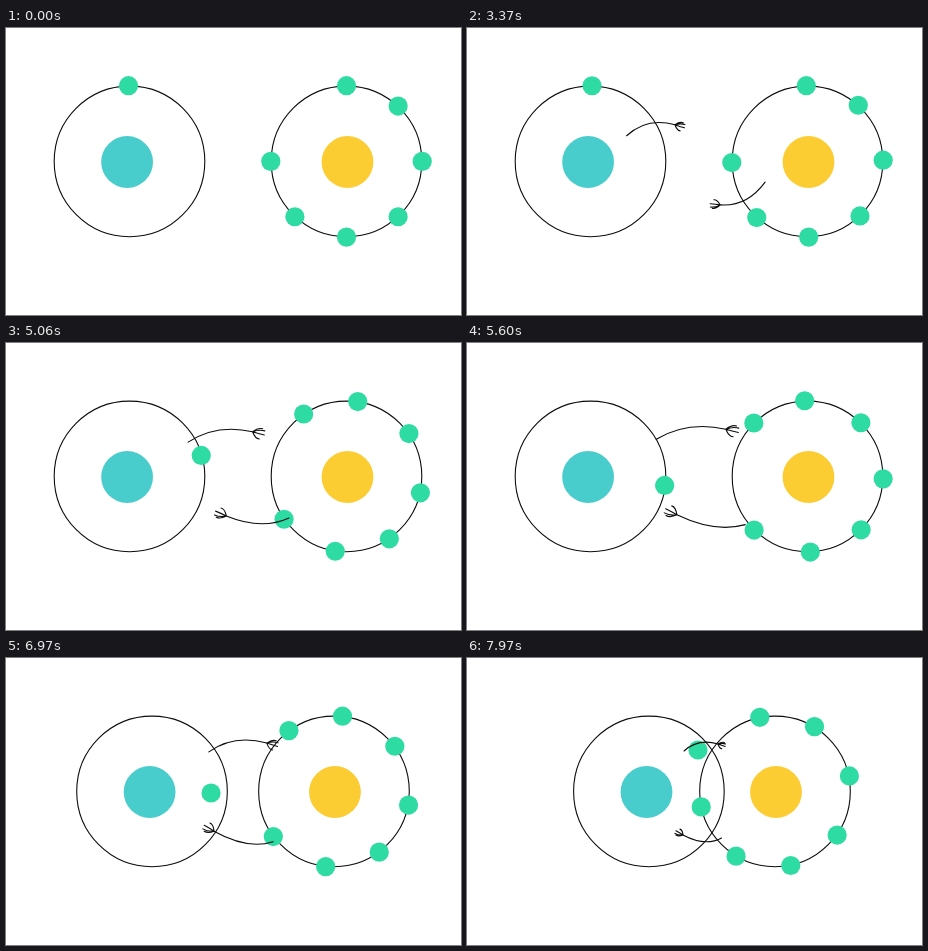
An HTML page with a canvas that plays this animation: 455x287 px, repeating every 8 s.

```html
<!DOCTYPE html>
<html lang="en">
<head>
<meta charset="utf-8">
<style>
html, body { margin: 0; height: 100%; overflow: hidden; background: #fff; }
canvas { display: block; }
</style>
</head>
<body>
<canvas width="455" height="287"></canvas>
<script>
const ctx = document.querySelector('canvas').getContext('2d');
const LOOP = 8000, STEP = 4600 / 60, FIRST_STEP = 3370;
const SPIN = 3325, CAUGHT = 5948, PULL = 6348, END = 7970;
const RING = 75.3, ORBIT = 75.7, MIDDLE = 133.4;

const progress = (t, from, to) => Math.min(1, Math.max(0, (t - from) / (to - from)));

function circle(x, y, r, fill) {
  ctx.beginPath();
  ctx.arc(x, y, r, 0, 2 * Math.PI);
  if (fill) {
    ctx.fillStyle = fill;
    ctx.fill();
  } else ctx.stroke();
}

function atom(x, nucleusX, color) {
  circle(nucleusX, 134, 25.9, color);
  circle(x, MIDDLE, RING);
}

const electron = (x, y) => circle(x, y, 9.6, '#2edba3');

function orbiting(x, degrees) {
  const a = degrees * Math.PI / 180;
  electron(x + ORBIT * Math.cos(a), MIDDLE + ORBIT * Math.sin(a));
}

function hand(size) {
  ctx.beginPath();
  for (const [x, y] of [[9, -5], [11.5, -3.5], [12, 0.5], [8, 5.5]]) {
    ctx.moveTo(0, 0);
    ctx.quadraticCurveTo(x * 0.5 * size, y * 1.1 * size, x * size, y * size);
  }
  ctx.stroke();
}

// Each pose is shoulder x, y, wrist x, y
function arm(rest, reached, pulled, bend, spin, pull) {
  const [sx, sy, wx, wy] = rest.map((v, i) =>
    v + (reached[i] - v) * spin + (pulled[i] - reached[i]) * pull);
  const length = Math.hypot(wx - sx, wy - sy);
  const sag = bend * Math.min(13.5, length * 0.27);
  const cx = (sx + wx) / 2 + sag * 0.3, cy = (sy + wy) / 2 + sag;
  ctx.beginPath();
  ctx.moveTo(sx, sy);
  ctx.quadraticCurveTo(cx, cy, wx, wy);
  ctx.stroke();

  ctx.save();
  ctx.translate(wx, wy);
  ctx.rotate(Math.atan2(wy - cy, wx - cx));
  hand(0.2 + length / 80);
  ctx.restore();
}

function draw(t) {
  const spin = progress(t, SPIN, CAUGHT), pull = progress(t, PULL, END);
  const leftX = 123.5 + 58.4 * pull, rightX = 340.5 - 32.5 * pull;

  ctx.fillStyle = '#fff';
  ctx.fillRect(0, 0, 455, 287);
  ctx.strokeStyle = '#0c0c0c';
  ctx.lineWidth = 1.1;
  ctx.lineCap = 'round';

  atom(leftX, leftX - 2.4, '#49cccc');
  atom(rightX, rightX + 1, '#fbcd33');

  if (pull) electron(193 + 27 * pull + 11 * pull ** 2, 162 - 70 * pull);
  else orbiting(leftX - 1, -90 + 112 * spin);

  // Seven of eight places, with the diagonals drawn slightly towards the poles
  for (let i = -2; i <= 4; i++) {
    const angle = 45 * i + 2 * Math.sin(i * Math.PI / 2);
    orbiting(rightX + 0.3 * pull, angle - 52.2 * spin + 40.4 * pull);
  }

  const armsShown = t >= 2910 || (t >= 500 && t < 1190) || (t >= 1820 && t < 2380);
  if (armsShown) {
    arm([159, 108, 207, 97], [194, 94.5, 267, 84.5], [217, 93, 251, 86], -1, spin, pull);
    arm([298.5, 153.5, 254, 177], [275, 186, 203, 171], [254.5, 180, 216, 177], 1, spin, pull);
  }
}

function tick() {
  let t = performance.now() % LOOP;
  if (t >= FIRST_STEP) t = FIRST_STEP + Math.floor((t - FIRST_STEP) / STEP + 0.1) * STEP;
  draw(t);
  requestAnimationFrame(tick);
}
tick();
</script>
</body>
</html>
```
